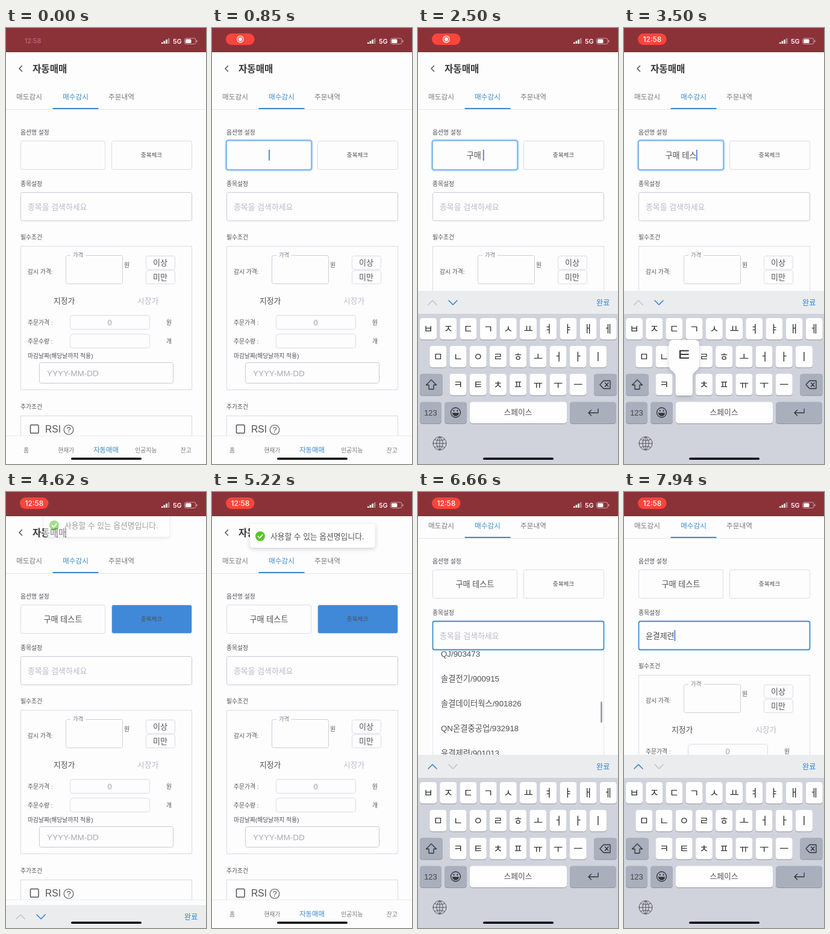
Recreate the animation shown at these times as an HTML page. Size 332x720 px, loop 7.99 s.

```html
<!DOCTYPE html>
<html lang="ko">
<head>
<meta charset="utf-8">
<title>자동매매</title>
<style>
  html, body { margin: 0; width: 100%; height: 100%; overflow: hidden; background: #fefdfe; }
  svg { display: block; width: 332px; height: 720px; }
  text { font-family: "Liberation Sans", "Noto Sans CJK KR", "Noto Sans CJK", sans-serif; white-space: pre; }
  .status text { font-family: Inter, sans-serif; }
</style>
</head>
<body>
<svg id="stage" viewBox="0 0 332 720">
  <defs>
    <clipPath id="listClip"><rect x="24" y="319" width="285" height="288"/></clipPath>
    <filter id="soft" x="-20%" y="-40%" width="140%" height="190%">
      <feDropShadow dx="0" dy="2" stdDeviation="3" flood-color="#3c3c50" flood-opacity=".25"/>
    </filter>
  </defs>
</svg>
<script>
const LOOP = 7990;
const PAPER = '#fefdfe', INK = '#505054', GREY = '#77777c', FAINT = '#bbb9c4', LINE = '#dcd9ea';
const BLUE = '#2d86dc', ACCENT = '#3a8ccb', CARET = '#4a7ede', DARK_INK = '#323236';
const stage = document.getElementById('stage');

function add(parent, tag, attrs = {}) {
  const el = document.createElementNS('http://www.w3.org/2000/svg', tag);
  for (const [name, value] of Object.entries(attrs)) el.setAttribute(name, value);
  return parent.appendChild(el);
}
const group = (parent, attrs) => add(parent, 'g', attrs);
const path = (parent, d, stroke, width = 1.3, attrs) =>
  add(parent, 'path', { d, stroke, 'stroke-width': width, fill: 'none', 'stroke-linecap': 'round', 'stroke-linejoin': 'round', ...attrs });
const box = (parent, x, y, width, height, fill, attrs) =>
  add(parent, 'rect', { x, y, width, height, fill, ...attrs });
const frame = (parent, x, y, w, h, stroke = LINE, attrs) =>
  box(parent, x + .5, y + .5, w - 1, h - 1, PAPER, { stroke, rx: 3, ...attrs });
// Text placed by the vertical centre of its glyphs.
function label(parent, x, cy, content, size, fill = INK, attrs) {
  const el = add(parent, 'text', { x, y: cy + size * .36, 'font-size': size, fill, ...attrs });
  el.textContent = content;
  return el;
}
const MID = { 'text-anchor': 'middle' };

// Scrolling page
box(stage, 0, 0, 332, 720, PAPER);
const page = group(stage);
path(page, 'M26.500 62.500l-4.500 4.500 4.500 4.500', INK, 1.5);
label(page, 44, 67, '자동매매', 15.6, '#3a3a3e', { 'font-weight': 700 });
label(page, 17, 113.5, '매도감시', 11.7, GREY);
label(page, 94, 113.5, '매수감시', 11.7, ACCENT);
label(page, 170, 113.5, '주문내역', 11.7, GREY);
box(page, 0, 134, 332, 1, '#e6e4ee');
box(page, 77.5, 132, 76, 2, ACCENT);

label(page, 24, 172.5, '옵션명 설정', 9.8);
const optionBox = frame(page, 24, 186, 141, 48);
const optionHalo = box(page, 23, 185, 143, 50, 'none', { rx: 4.5, stroke: '#b4d8fb', 'stroke-width': 3 });
const optionRing = box(page, 24, 186, 141, 48, 'none', { rx: 3, stroke: '#79b3ee', 'stroke-width': 1.6 });
const optionText = label(page, 94.5, 210, '', 13.1, INK, MID);
const optionCaret = box(page, 94, 201, 1.8, 18, CARET);
const checkButton = frame(page, 175, 186, 134, 48);
label(page, 241.5, 210, '중복체크', 9.6, INK, { ...MID, 'font-weight': 500 });

label(page, 24, 257.5, '종목설정', 9.8);
label(page, 24, 345.5, '필수조건', 9.8);
frame(page, 24, 360, 285, 238, LINE, { rx: 0 });
label(page, 36, 402, '감시 가격:', 9.8);
frame(page, 99, 375, 95, 48, '#cfcdda');
box(page, 107, 374, 25, 3, PAPER);
label(page, 119.5, 374.5, '가격', 9.2, GREY, MID);
label(page, 196, 391.5, '원', 9.8);
[['이상', 376], ['미만', 400]].forEach(([name, y]) => {
  frame(page, 232, y, 49, 23);
  label(page, 256, y + 11.5, name, 13, INK, MID);
});
label(page, 79, 450.5, '지정가', 12.8);
label(page, 218, 450.5, '시장가', 12.8, FAINT);
[['주문가격 :', 474, '0', '원'], ['주문수량 :', 505, '', '개']].forEach(([name, y, value, unit]) => {
  label(page, 36, y + 12, name, 9.8);
  frame(page, 106, y, 133, 24, LINE, { rx: 4 });
  label(page, 172, y + 12.5, value, 13, '#a2a1aa', MID);
  label(page, 266, y + 12, unit, 9.8);
});
label(page, 36, 541.5, '마감날짜(해당날까지 적용)', 9.8);
frame(page, 55, 552, 223, 35, '#cac8d4');
label(page, 68, 570, 'YYYY-MM-DD', 13.5, '#a9a8b0');
label(page, 24, 625.5, '추가조건', 9.8);
frame(page, 24, 640, 285, 120, LINE, { rx: 0 });
box(page, 40.5, 655.5, 13.5, 13.5, 'none', { stroke: INK, 'stroke-width': 1.5, rx: 1.5 });
label(page, 65, 662, 'RSI', 15.6);
add(page, 'circle', { cx: 104, cy: 663.5, r: 7.8, fill: 'none', stroke: INK, 'stroke-width': 1.1 });
label(page, 104, 663.5, '?', 13, INK, MID);

// Stock list
const stocks = ['솔결바이오테라스/902746', '새벽결항공기/904718', '온결차/900563', '솔결전자우/900539', 'VELNO홀딩스/900549'];
const trades = ['화학', '전자', '금융지주', '생명', '통신', '부품'];
for (let i = 0; i < 11; i++) {
  const house = ['온결', '윤결', '솔결'][i % 3];
  stocks.push(`${house}${trades[i % trades.length]}/${900100 + i * 7919 % 9000}`);
}
stocks.push('QJ/903473', '솔결전기/900915', '솔결데이터웍스/901826', 'QN온결중공업/932918', '윤결제련/901013', '온결해운/901120');
const list = group(page, { 'clip-path': 'url(#listClip)' });
box(list, 24.5, 310, 284, 296.5, PAPER, { stroke: '#e6e4ee' });
const rows = group(list);
stocks.forEach((name, i) => label(rows, 38, 346.5 + 41 * i, name, 13.3));
const thumb = box(list, 303, 319, 3, 35, '#a3a3aa', { rx: 1.5 });

const searchBox = frame(page, 24, 271, 285, 48);
const searchText = label(page, 36, 295, '', 12.9);
const searchCaret = box(page, 36, 286, 1.8, 18, CARET);

const toast = group(page);
box(toast, 63, 53, 208, 39, '#fff', { rx: 5, filter: 'url(#soft)' });
add(toast, 'circle', { cx: 80, cy: 73, r: 8, fill: '#58c428' });
path(toast, 'M76.3 73.2l2.7 2.8 4.8-5.4', '#fff', 1.7);
label(toast, 97, 73, '사용할 수 있는 옵션명입니다.', 12.8);

// Bottom navigation
box(stage, 0, 673, 332, 47, PAPER);
box(stage, 0, 673, 332, 1, '#ebe9f1');
['홈', '현재가', '자동매매', '인공지능', '잔고'].forEach((name, i) =>
  label(stage, 33.5 + 66.3 * i, 697, name, i === 2 ? 11.4 : 9.8, i === 2 ? ACCENT : GREY, MID));

// Keyboard
const keyboard = group(stage);
box(keyboard, 0, 434, 332, 38, '#ebecee');
box(keyboard, 0, 472, 332, 248, '#d0d3dc');
const chevronUp = path(keyboard, 'M17 457l7-7 7 7', BLUE, 1.6);
const chevronDown = path(keyboard, 'M51 450l7 7 7-7', BLUE, 1.6);
label(keyboard, 296, 453.5, '완료', 12.2, BLUE);

const KEY = '#fefefe', DARK = '#a9afbc';
function cap(x, y, w, fill = KEY) {
  box(keyboard, x, y + 1, w, 35.5, '#8f939c', { rx: 4.5 });
  return box(keyboard, x, y, w, 35.5, fill, { rx: 4.5 });
}
const keys = {};
[['ㅂㅈㄷㄱㅅㅛㅕㅑㅐㅔ', 17, 479], ['ㅁㄴㅇㄹㅎㅗㅓㅏㅣ', 33.3, 525], ['ㅋㅌㅊㅍㅠㅜㅡ', 66.5, 571]].forEach(([letters, x0, y]) =>
  [...letters].forEach((letter, i) => {
    const x = x0 + 33.2 * i;
    keys[letter] = { x, y };
    cap(x - 14, y, 28);
    label(keyboard, x, y + 18, letter, 17, DARK_INK, MID);
  }));
cap(3, 571, 38, DARK);
path(keyboard, 'M22 581l-8.5 8.5h4.5v7h8v-7h4.5z', DARK_INK);
cap(292, 571, 38, DARK);
path(keyboard, 'M302 589l6-6.500h11v13h-11zM310.500 586l5.500 6m0-6l-5.500 6', DARK_INK);
cap(3, 617.5, 36, DARK);
label(keyboard, 21, 635.5, '123', 13, '#45454a', MID);
cap(44, 617.5, 37, DARK);
add(keyboard, 'circle', { cx: 62.5, cy: 635, r: 8, fill: 'none', stroke: DARK_INK, 'stroke-width': 1.3 });
path(keyboard, 'M57.500 636h10a5 4.500 0 0 1-10 0z', DARK_INK, .8, { fill: DARK_INK });
path(keyboard, 'M59.500 631.500v1M65.500 631.500v1', DARK_INK, 1.8);
const spaceKey = cap(86, 617.5, 161);
label(keyboard, 166, 634.5, '스페이스', 12.8, '#55555a', MID);
cap(252, 617.5, 77, DARK);
path(keyboard, 'M299 629v6.500h-16m4.500-4.500l-4.500 4.500 4.500 4.500', DARK_INK);
path(keyboard, 'M25 686a11 11 0 1 0 22 0a11 11 0 1 0-22 0zM25 686h22M36 675v22M36 675c-7 6-7 16 0 22M36 675c7 6 7 16 0 22M27.500 679.500q8.500 3.500 17 0M27.500 692.500q8.500-3.500 17 0', '#55555a', 1);

const bubble = group(keyboard);
add(bubble, 'path', {
  d: 'M-18-10h36q7 0 7 7v35q0 6-5 9q-6 4-6 10v27q0 4-4 4h-20q-4 0-4-4v-27q0-6-6-10q-5-3-5-9v-35q0-7 7-7z',
  fill: KEY, filter: 'url(#soft)'
});
const bubbleText = label(bubble, 0, 15, '', 28, DARK_INK, MID);

// Status bar
box(stage, 0, 0, 332, 40, '#8b3238');
const status = group(stage, { class: 'status' });
const plainTime = label(status, 44.5, 21.5, '12:58', 11, '#c07088', MID);
const pill = box(status, 23, 9, 47.5, 19, '#fa453c', { rx: 9.5 });
const record = group(status);
add(record, 'circle', { cx: 47, cy: 18.5, r: 5.3, fill: 'none', stroke: '#fff0f0', 'stroke-width': 1.2 });
add(record, 'circle', { cx: 47, cy: 18.5, r: 3.2, fill: '#fff0f0' });
const pillTime = label(status, 47, 18.5, '12:58', 12, '#fff8f8', { ...MID, 'font-weight': 500 });
for (let i = 0; i < 4; i++)
  box(status, 258 + 3.6 * i, 23.5 - 2.2 * i, 2.6, 2.5 + 2.2 * i, '#fbf0f2', { rx: .6, opacity: i < 3 ? 1 : .45 });
label(status, 277, 22, '5G', 10.8, '#fbf0f2', { 'font-weight': 600 });
box(status, 296.5, 17, 18.5, 9.5, 'none', { rx: 2.8, stroke: '#cfa3a8' });
box(status, 298, 18.5, 9.5, 6.5, '#fff8f8', { rx: 1.5 });
box(status, 316, 20, 1.4, 3.6, '#cfa3a8', { rx: .7 });

box(stage, 108, 709.5, 117, 3.6, '#0c0c0e', { rx: 1.8 });

// Each press: time, key, field value once the key is released.
const presses = [
  [1570, 'ㄱ', 'ㄱ'], [1760, 'ㅜ', '구'], [1950, 'ㅁ', '굼'], [2140, 'ㅐ', '구매'], [2350, ' ', '구매 '],
  [2550, 'ㅌ', '구매 ㅌ'], [2750, 'ㅔ', '구매 테'], [2960, 'ㅅ', '구매 텟'], [3200, 'ㅡ', '구매 테스'],
  [3450, 'ㅌ', '구매 테슽'], [3680, 'ㅡ', '구매 테스트']
];
const HOLD = 100, FOCUS = 850, CHECK = 4350, SEARCH = 5580, PICK = 7260;

const ramp = (t, start, length) => Math.min(1, Math.max(0, (t - start) / length));
const easeOut = u => 1 - (1 - u) ** 3;
const smooth = u => u * u * (3 - 2 * u);
const show = (el, on) => el.setAttribute('opacity', +on);
const shift = (el, x, y) => el.setAttribute('transform', `translate(${x} ${y})`);
function write(el, content) { if (el.textContent !== content) el.textContent = content; }

function drawTyping(t) {
  const done = presses.filter(p => t >= p[0] + HOLD).pop();
  const held = presses.find(p => t >= p[0] && t < p[0] + HOLD);
  write(optionText, done ? done[2] : '');
  const key = held && keys[held[1]];
  show(bubble, !!key);
  if (key) {
    shift(bubble, Math.min(305, Math.max(27, key.x)), key.y - 46);
    write(bubbleText, held[1]);
  }
  spaceKey.setAttribute('fill', held && held[1] === ' ' ? DARK : KEY);

  const focused = t >= FOCUS && t < CHECK;
  [optionHalo, optionRing].forEach(el => show(el, focused));
  const idle = t - (done ? done[0] : 1100);
  show(optionCaret, focused && (idle < 0 || idle % 1000 < 550));
  optionCaret.setAttribute('x', 94 + (done ? optionText.getComputedTextLength() / 2 : 0));
}

function drawSearch(t) {
  const focused = t >= SEARCH, picked = t >= PICK;
  searchBox.setAttribute('stroke', focused ? ACCENT : '#cac8d4');
  searchBox.setAttribute('stroke-width', focused ? 1.8 : 1);
  write(searchText, picked ? '윤결제련' : '종목을 검색하세요');
  searchText.setAttribute('fill', picked ? INK : FAINT);
  searchCaret.setAttribute('x', 36 + (picked ? searchText.getComputedTextLength() : 0));
  show(searchCaret, focused && (t - 5700 + 1000) % 1000 < 550);

  const scroll = 677 * easeOut(ramp(t, 6050, 610));
  show(list, focused && !picked);
  shift(rows, 0, -scroll);
  shift(thumb, 0, scroll * .1256);
  show(thumb, ramp(t, 6050, 80) - ramp(t, 6900, 250));
}

function draw(t) {
  drawTyping(t);
  drawSearch(t);

  const raised = easeOut(ramp(t, 900, 534)) - smooth(ramp(t, CHECK, 350)) + easeOut(ramp(t, 5600, 534));
  shift(keyboard, 0, 286 * (1 - raised));
  const second = t > 5000;
  chevronUp.setAttribute('stroke', second ? BLUE : '#c3c4c9');
  chevronDown.setAttribute('stroke', second ? '#c3c4c9' : BLUE);
  shift(page, 0, -58 * easeOut(ramp(t, 5660, 534)));

  checkButton.setAttribute('fill', t >= CHECK && t < SEARCH ? '#4089d8' : PAPER);

  const toastIn = easeOut(ramp(t, 4550, 300));
  show(toast, toastIn - ramp(t, 7300, 300));
  shift(toast, 0, -40 * (1 - toastIn));

  const pillIn = ramp(t, 350, 300), swap = ramp(t, 2750, 250);
  show(plainTime, 1 - pillIn);
  show(pill, pillIn);
  show(record, pillIn * (1 - swap));
  show(pillTime, swap);
}

let origin;
function tick(now) {
  origin ??= now;
  draw((now - origin) % LOOP);
  requestAnimationFrame(tick);
}
draw(0);
requestAnimationFrame(tick);
</script>
</body>
</html>
```
